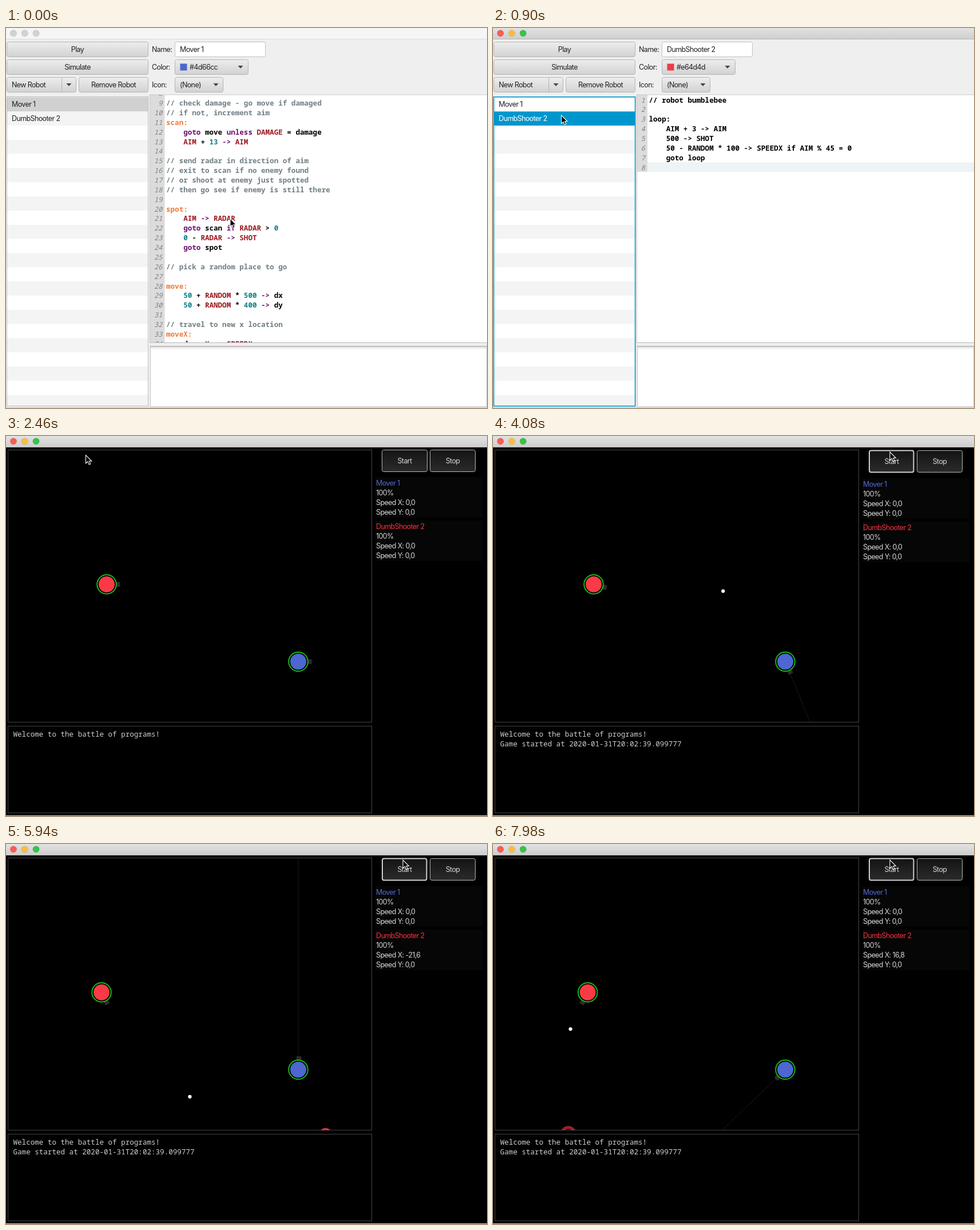
These frames come from a looping animation (841 px wide and 666 px high, 8000 ms). An HTML page:

```html
<!DOCTYPE html>
<html lang="en">
<head>
<meta charset="utf-8">
<title>Robot battle</title>
<style>
  html, body { margin: 0; width: 100%; height: 100%; overflow: hidden; background: #efefef; }
  svg { display: block; }
  text { font: 12.5px Inter, sans-serif; letter-spacing: -0.62px; white-space: pre; }
  .code { font: 600 12.58px "Noto Sans Mono", monospace; letter-spacing: 0; }
  .log { font-weight: 500; }
  .num { font: italic 12px "Noto Sans Mono", monospace; letter-spacing: 0; fill: #808080; }
</style>
</head>
<body>
<svg id="stage" width="841" height="666" viewBox="0 0 841 666">
  <defs>
    <linearGradient id="bar" x2="0" y2="1"><stop stop-color="#e2e2e2"/><stop offset="1" stop-color="#cdcdcd"/></linearGradient>
    <linearGradient id="button" x2="0" y2="1"><stop stop-color="#ededed"/><stop offset="1" stop-color="#d2d2d2"/></linearGradient>
    <linearGradient id="pressed" x2="0" y2="1"><stop stop-color="#dcdcdc"/><stop offset="1" stop-color="#c6c6c6"/></linearGradient>
    <linearGradient id="dark" x2="0" y2="1"><stop stop-color="#141414"/><stop offset="1" stop-color="#2b2b2b"/></linearGradient>
    <linearGradient id="shade" x2="0" y2="1"><stop stop-color="#e4e4e4"/><stop offset="1" stop-color="#fff"/></linearGradient>
    <clipPath id="editorClip"><rect x="251" y="117" width="590" height="434"/></clipPath>
    <clipPath id="arenaClip"><rect x="4" y="25" width="635" height="476.5"/></clipPath>
  </defs>
  <g id="scene"></g>
</svg>
<script>
const LOOP = 8000, FRAME = 60;
const SELECT = 900, HIGHLIGHT = 1380, PLAY = 2340, BATTLE = 2460, PRESS = 3300, START = 3420;
const ACCENT = '#039ed3', RED = '#fa3a46', BLUE = '#4d66d0';

const moverCode = `
// check damage - go move if damaged
// if not, increment aim
scan:
    goto move unless DAMAGE = damage
    AIM + 13 -> AIM

// send radar in direction of aim
// exit to scan if no enemy found
// or shoot at enemy just spotted
// then go see if enemy is still there

spot:
    AIM -> RADAR
    goto scan if RADAR > 0
    0 - RADAR -> SHOT
    goto spot

// pick a random place to go

move:
    50 + RANDOM * 500 -> dx
    50 + RANDOM * 400 -> dy

// travel to new x location
moveX:
    dx - X -> SPEEDX`.split('\n');

const shooterCode = `// robot bumblebee

loop:
    AIM + 3 -> AIM
    500 -> SHOT
    50 - RANDOM * 100 -> SPEEDX if AIM % 45 = 0
    goto loop
`.split('\n');

const tokenColors = [
  [/^\/\/.*/, '#718086'],
  [/^\w+:/, '#f07c3a'],
  [/^(goto|if|unless|->)/, '#6d1070'],
  [/^[A-Z]+\b/, '#9c1a20'],
  [/^\d+/, '#128088'],
  [/^(\s+|\w+|.)/, '#000'],
];

const escapeText = s => s.replace(/&/g, '&amp;').replace(/</g, '&lt;').replace(/>/g, '&gt;');
const text = (x, y, s, fill = '#222', extra = '') =>
  `<text x="${x}" y="${y}" fill="${fill}" ${extra}>${escapeText(s)}</text>`;
const centered = (x, y, s, fill) => text(x, y, s, fill, 'text-anchor="middle"');
const rect = (x, y, w, h, fill, extra = '') =>
  `<rect x="${x}" y="${y}" width="${w}" height="${h}" fill="${fill}" ${extra}/>`;
const box = (x, y, w, h, fill, stroke, radius = 0, line = 1) =>
  rect(x + line / 2, y + line / 2, w - line, h - line, fill,
    `stroke="${stroke}" stroke-width="${line}" rx="${radius}"`);
const circle = (x, y, r, fill, extra = '') =>
  `<circle cx="${x}" cy="${y}" r="${r}" fill="${fill}" ${extra}/>`;
const button = (x, y, w) => box(x, y, w, 27, 'url(#button)', '#b4b4b4', 3);
const triangle = (x, y) => `<path d="M${x - 4.5} ${y - 2}h9l-4.5 5z" fill="#444"/>`;

function highlight(line) {
  let out = '';
  while (line) {
    for (const [pattern, color] of tokenColors) {
      const match = line.match(pattern);
      if (!match) continue;
      out += `<tspan fill="${color}">${escapeText(match[0])}</tspan>`;
      line = line.slice(match[0].length);
      break;
    }
  }
  return out;
}

function codeView(lines, first, top, gutter, colored) {
  const rows = lines.map((line, i) => {
    const y = top + i * 16.86;
    return text(gutter - 4, y, String(first + i), '#808080', 'class="num" text-anchor="end"') +
      `<text class="code" x="${gutter + 2.5}" y="${y}">${colored ? highlight(line) : escapeText(line)}</text>`;
  });
  return rect(251, 117, gutter - 251, first > 1 ? 434 : 135, '#dcdcdc') + rows.join('');
}

function titleBar(active) {
  const colors = active ? ['#fb5c54', '#f9bd40', '#34c648'] : ['#d2d2d2', '#d2d2d2', '#d2d2d2'];
  return rect(0, 0, 841, 20, active ? 'url(#bar)' : '#f5f5f5') +
    rect(0, 19, 841, 1, active ? '#b8b8b8' : '#dadada') +
    colors.map((c, i) => circle(13 + i * 19.8, 9.3, 5.7, c, 'stroke="#0002" stroke-width=".7"')).join('');
}

function robotList(selected, focused) {
  let out = rect(1, 120, 248, 543, '#fff');
  for (let i = 0; i < 22; i++) {
    const y = 121.5 + i * 24.83;
    const fill = i === selected ? (focused ? '#0096cc' : '#d0d0d0') : i % 2 ? '#f4f4f4' : '#fff';
    out += rect(2, y, 246, Math.min(24.83, 662 - y), fill);
  }
  ['Mover 1', 'DumbShooter 2'].forEach((name, i) => {
    out += text(10, 138 + i * 25, name, focused && i === selected ? '#fff' : '#222');
  });
  return out + (focused ? box(.5, 120, 249, 543.5, 'none', ACCENT, 0, 1.7) : box(1, 120, 248, 543, 'none', '#bdbdbd'));
}

function editor(t) {
  const selected = t >= SELECT ? 1 : 0, playing = t >= PLAY;
  const name = selected ? 'DumbShooter 2' : 'Mover 1';
  const code = selected
    ? rect(270, 235.5, 571, 16.8, '#eef4f5') + codeView(shooterCode, 1, 130.5, 270, t >= HIGHLIGHT)
    : codeView(moverCode, 8, 119.3, 277.5, true);
  return rect(0, 0, 841, 666, '#efefef') + titleBar(selected) +
    (playing ? box(.5, 23.5, 249, 28, 'url(#pressed)', ACCENT, 3, 2) : button(1, 24, 248)) +
    centered(125, 42, 'Play') +
    button(1, 55, 248) + centered(125, 73, 'Simulate') +
    button(1, 86, 122) + rect(97, 87, 1, 25, '#b4b4b4') + text(10, 104, 'New Robot') + triangle(110, 99) +
    button(127, 86, 122) + centered(188, 104, 'Remove Robot') +
    text(255, 42, 'Name:') + text(255, 73, 'Color:') + text(255, 104, 'Icon:') +
    box(295, 24, 159, 27, '#fff', '#c0c0c0', 3) + text(304, 42, name) +
    button(295, 55, 129) + rect(304.5, 62.5, 12, 12, selected ? '#ee3c48' : BLUE) +
    text(321, 73, selected ? '#e64d4d' : '#4d66cc') + triangle(410, 68) +
    button(295, 86, 85) + text(304, 104, '(None)') + triangle(367, 99) +
    robotList(selected, selected && !playing) +
    rect(251, 117, 590, 434, '#fff') + `<g clip-path="url(#editorClip)">${code}</g>` +
    rect(251, 116.5, 590, 1, '#c8c8c8') + rect(251, 117, 1, 434, '#c8c8c8') +
    rect(251, 551, 590, 1, '#bcbcbc') + rect(251, 557, 590, 1, '#bcbcbc') +
    box(252, 558, 589, 106, '#fff', '#c4c4c4') + rect(253, 559, 587, 5, 'url(#shade)') +
    rect(0, 665, 841, 1, '#c4c4c4');
}

// Battle: turrets turn once per program loop; the shooter's speed changes at 45 and 90 degrees.
const LAP = 115, RED_START = 3450, BLUE_START = 3500;
const FLOOR = 508.5, WALL = 645, BULLET_SPEED = .44;
const shots = [1, 6, 11, 17, 22, 27, 32, 38];
const redTime = lap => RED_START + lap * LAP;
const laps = (t, start) => Math.max(0, Math.floor((t - start) / LAP));
const radians = deg => deg * Math.PI / 180;

function redX(t) {
  const scale = .000545, left = redTime(15), right = redTime(30);
  const moved = (from, to) => Math.max(0, Math.min(t, to) - from) * scale;
  return 176 - 21.6 * moved(left, right) + 16.8 * moved(right, LOOP);
}

function robot(x, y, angle, color) {
  return `<g transform="translate(${x} ${y})">` +
    rect(16, -4.2, 7.5, 8.4, '#2c2c2c', `transform="rotate(${angle})"`) +
    circle(0, 0, 16.8, '#000', 'stroke="#18bc18" stroke-width="1.9"') + circle(0, 0, 14, color) + '</g>';
}

function shot(lap, t) {
  const fired = redTime(lap), age = t - fired;
  if (age < 0) return '';
  const a = radians(lap * 3), dx = Math.cos(a), dy = Math.sin(a), x = redX(fired), y = 260;
  const reach = Math.min((FLOOR - y) / dy, dx > 0 ? (WALL - x) / dx : Infinity);
  const d = Math.min(age * BULLET_SPEED, reach);
  const px = x + dx * d, py = y + dy * d;
  const burst = age - reach / BULLET_SPEED;
  if (burst < 0) return circle(px, py, 3.1, '#fff');
  if (burst > 480) return '';
  const outer = 4 + burst * .036, inner = Math.min(outer, Math.max(0, (burst - 150) * .07));
  return circle(px, py, (outer + inner) / 2, 'none',
    `stroke="#f83844" stroke-width="${outer - inner}" opacity="${Math.min(1, 1.45 - burst / 340)}"`) ;
}

function arena(t) {
  const blueAngle = laps(t, BLUE_START) * 13, redAngle = laps(t, RED_START) * 3;
  let out = '';
  if (t >= BLUE_START) {
    const a = radians(blueAngle + 3 * Math.sin(radians(blueAngle)));
    out += `<path d="M511 395.5l${900 * Math.cos(a)} ${900 * Math.sin(a)}" stroke="#1b1b1f"/>`;
  }
  out += robot(redX(t), 260, redAngle, RED) + robot(511, 395.5, blueAngle, BLUE);
  return `<g clip-path="url(#arenaClip)">${out + shots.map(lap => shot(lap, t)).join('')}</g>`;
}

function statusPanel(y, name, color, speed) {
  return rect(645, y - 15, 188, 71, '#060606') + text(647, y, name, color) +
    ['100%', `Speed X: ${speed}`, 'Speed Y: 0,0'].map((s, i) => text(647, y + 17 * (i + 1), s, '#d6d6d6')).join('');
}

function battle(t) {
  const focus = t >= PRESS ? 1 : 0;
  const speed = t >= redTime(30) ? '16,8' : t >= redTime(15) ? '-21,6' : '0,0';
  const logLine = (y, s) => text(12.5, y, s, '#cfcfcf', 'class="code log"');
  return rect(0, 0, 841, 666, '#000') + titleBar(true) +
    box(3, 24, 637, 478, '#000', '#444') + arena(t) + box(3, 508, 637, 153, '#000', '#444') +
    logLine(527, 'Welcome to the battle of programs!') +
    (t >= START ? logLine(544, 'Game started at 2020-01-31T20:02:39.099777') : '') +
    (focus ? box(657, 24.5, 79.5, 40, 'url(#dark)', '#d0d0d0', 3, 2) : box(657, 24, 80, 39, 'url(#dark)', '#b8b8b8', 3)) +
    box(741, 24 + focus, 80, 39, 'url(#dark)', '#b8b8b8', 3) +
    centered(697, 48 + focus, 'Start', '#d6d6d6') + centered(781, 48 + focus, 'Stop', '#d6d6d6') +
    statusPanel(87 + 2 * focus, 'Mover 1', '#5468d4', '0,0') +
    statusPanel(163 + 2 * focus, 'DumbShooter 2', '#fc303c', speed) +
    rect(0, 665, 841, 1, '#dedede');
}

const pointerPath = [
  [0, 392, 334], [120, 392, 334], [780, 119.5, 153], [1200, 119.5, 153],
  [1980, 139.5, 33.5], [2520, 139.5, 33.5], [3180, 694, 28], [LOOP, 694, 28],
];

function pointer(t) {
  const i = pointerPath.findIndex(p => p[0] > t);
  const [t0, x0, y0] = pointerPath[i - 1], [t1, x1, y1] = pointerPath[i];
  const u = (t - t0) / (t1 - t0), e = u * u * (3 - 2 * u);
  return `<path transform="translate(${x0 + (x1 - x0) * e} ${y0 + (y1 - y0) * e})"
    d="M0 0V14.5L3.4 11.4L5.7 16.6L8.2 15.5L5.9 10.5H10.3Z" fill="#000" stroke="#fff" stroke-width="1.1"/>`;
}

const scene = document.getElementById('scene');
const began = performance.now();
let shown = -1;

function tick() {
  const t = Math.floor((performance.now() - began) % LOOP / FRAME) * FRAME;
  if (t !== shown) {
    shown = t;
    scene.innerHTML = (t >= BATTLE ? battle(t) : editor(t)) + pointer(t);
  }
  requestAnimationFrame(tick);
}
tick();
</script>
</body>
</html>
```
